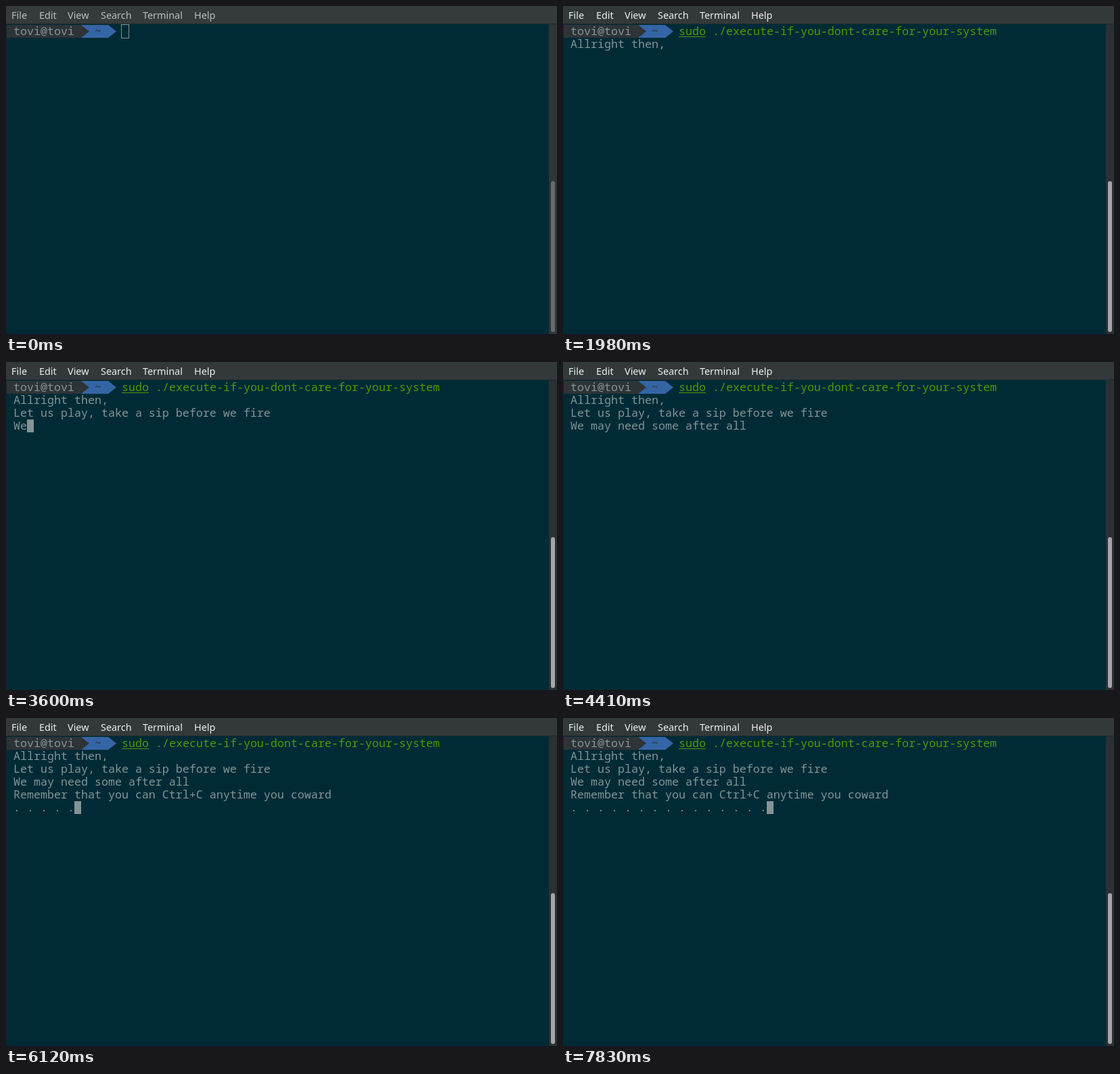
Recreate the animation shown at these times as an HTML page with a canvas. Size 814 by 485 pixels, loop 8000 ms.

```html
<!DOCTYPE html>
<html lang="en">
<head>
<meta charset="utf-8">
<title>Terminal session</title>
<style>
  html, body { margin: 0; width: 814px; height: 485px; overflow: hidden; background: #002b36; }
  canvas { display: block; }
</style>
</head>
<body>
<canvas id="stage" width="814" height="485"></canvas>
<script>
const ctx = document.getElementById("stage").getContext("2d");

const LOOP = 8000, TICK = 90;
const CELL = 10, ROW = 19, LEFT = 1, TOP = 28, BASELINE = 15;
const FOCUS_START = 90, FOCUS_END = 270, COMMAND_AT = 270;
const BLINK = 612, BLINK_START = 360;
const MONO = "16.667px 'Noto Sans Mono', monospace";
const MENU = "14.4px 'Noto Sans', sans-serif";
const TEXT = "#839496", GREEN = "#4e9a06", DARK = "#2e3436", BLUE = "#3465a4";

const USER = "tovi@tovi";
const COMMAND = "sudo ./execute-if-you-dont-care-for-your-system";
const PROMPT_CELLS = 17;
const MENU_ITEMS = [["File", 8], ["Edit", 49], ["View", 91], ["Search", 140], ["Terminal", 202], ["Help", 278]];

// Each phrase prints word by word: text, start time, delay per word.
const phrases = [
  ["\n Allright", 720, 0],
  ["then, \n", 1170, 90],
  ["Let us play,", 2340, 90],
  ["take a sip before we fire \n", 2880, 90],
  ["We may need some after all \n", 3600, 90],
  ["Remember that you can Ctrl+C anytime you coward \n", 4414, 86.5],
  [". ".repeat(15).trim(), 5370, 173]
];
const words = phrases.flatMap(([text, start, step]) =>
  text.split(" ").map((word, i) => ({ word, at: start + i * step })));

const cellX = col => LEFT + col * CELL;
const rowY = row => TOP + row * ROW;

function rect(x, y, w, h, color) {
  ctx.fillStyle = color;
  ctx.fillRect(x, y, w, h);
}

function write(text, x, y, color) {
  ctx.fillStyle = color;
  ctx.fillText(text, x, y);
}

function writeCells(text, col, row, color) {
  write(text, cellX(col), rowY(row) + BASELINE, color);
}

function mix(from, to, k) {
  return `rgb(${from.map((v, i) => Math.round(v + (to[i] - v) * k)).join(",")})`;
}

function arrow(x, color) {
  ctx.fillStyle = color;
  ctx.beginPath();
  ctx.moveTo(x, TOP);
  ctx.lineTo(x + 12, TOP + ROW / 2);
  ctx.lineTo(x, TOP + ROW);
  ctx.fill();
}

function drawWindow(focus) {
  rect(0, 0, 814, 485, "#002b36");
  rect(0, 0, 814, 26, mix([53, 58, 60], [51, 57, 59], focus));
  rect(0, 26, 814, 1, "#20282b");
  rect(802, 27, 12, 458, mix([48, 53, 55], [43, 48, 51], focus));
  ctx.fillStyle = mix([103, 106, 108], [164, 166, 167], focus);
  ctx.beginPath();
  ctx.roundRect(805, 259, 6, 223, 3);
  ctx.fill();
  ctx.font = MENU;
  const menuColor = mix([187, 190, 191], [238, 238, 236], focus);
  for (const [label, x] of MENU_ITEMS) write(label, x, 19, menuColor);
}

function drawPrompt() {
  rect(LEFT, TOP, 110, ROW, DARK);
  rect(111, TOP, 40, ROW, BLUE);
  arrow(111, DARK);
  arrow(151, BLUE);
  writeCells(USER, 1, 0, TEXT);
  writeCells("~", 13, 0, DARK);
}

function drawCursor(col, row, time) {
  if (time < FOCUS_START) {
    ctx.strokeStyle = TEXT;
    ctx.lineWidth = 1;
    ctx.strokeRect(cellX(col) - 0.5, rowY(row) - 0.5, CELL + 1, ROW + 1);
    return;
  }
  const phase = (time - BLINK_START + BLINK) % BLINK;
  if (time < BLINK_START || phase < BLINK / 2) rect(cellX(col), rowY(row), CELL, ROW, TEXT);
}

function draw(time) {
  const focus = Math.min(1, Math.max(0, (time - FOCUS_START + TICK) / (FOCUS_END - FOCUS_START)));
  drawWindow(time < FOCUS_START ? 0 : focus);
  ctx.font = MONO;
  drawPrompt();

  const command = time >= COMMAND_AT ? COMMAND : "";
  const printed = words.filter(w => w.at <= time)
    .map(w => w.word === "\n" ? "\n" : " " + w.word).join("");
  const lines = (" ".repeat(PROMPT_CELLS) + command + printed).split("\n");

  if (command) {
    writeCells(command, PROMPT_CELLS, 0, GREEN);
    rect(cellX(PROMPT_CELLS), TOP + 17, 4 * CELL, 1, GREEN);
  }
  lines.slice(1).forEach((line, i) => writeCells(line, 0, i + 1, TEXT));
  drawCursor(lines.at(-1).length, lines.length - 1, time);
}

function frame() {
  const time = performance.now() % LOOP;
  draw(Math.floor(time / TICK) * TICK);
  requestAnimationFrame(frame);
}
frame();
</script>
</body>
</html>
```
